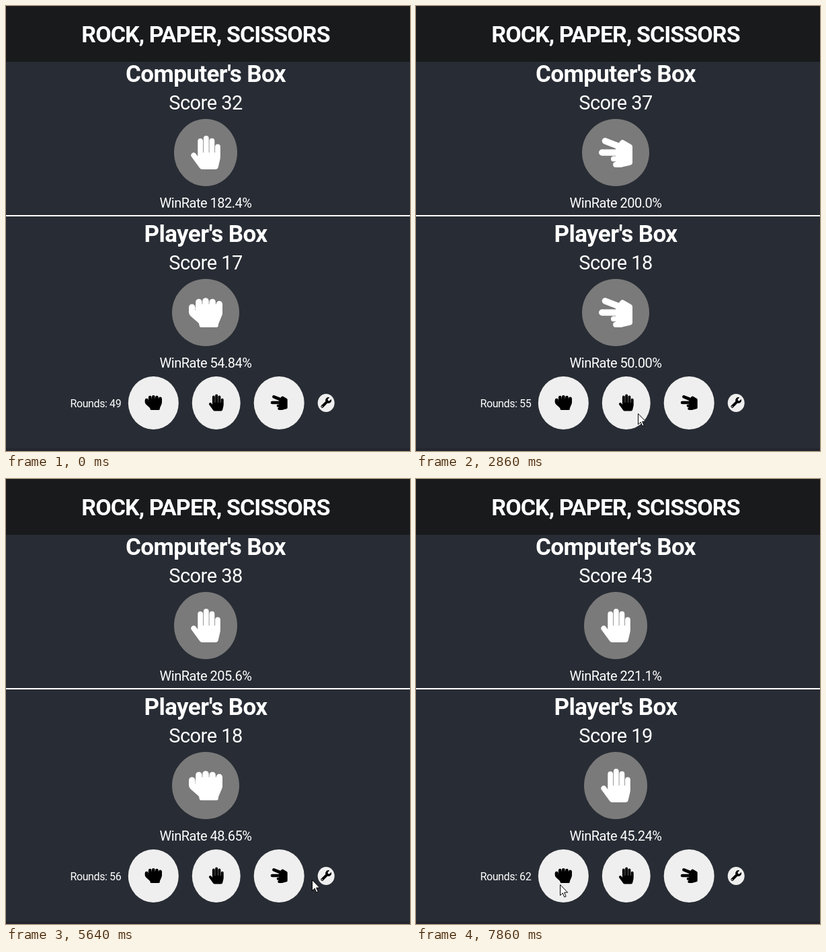
Animation, 601 px wide and 662 px high, one loop 8000 ms. Source, as an HTML page:

```html
<!DOCTYPE html>
<html lang="en">
<head>
<meta charset="utf-8">
<title>Rock, Paper, Scissors</title>
<style>
html, body { margin: 0; width: 100%; height: 100%; overflow: hidden; background: #282c34; }
svg { display: block; width: 601px; height: 662px; }
text { font-family: Roboto, "Open Sans", sans-serif; fill: #fff; text-anchor: middle; }
.title { font-size: 34px; font-weight: 700; letter-spacing: -.9px; }
.name { font-size: 35px; font-weight: 700; letter-spacing: -.6px; }
.score { font-size: 29px; letter-spacing: -.5px; }
.rate { font-size: 20px; letter-spacing: -.5px; }
.rounds { font-size: 16px; letter-spacing: -.4px; text-anchor: start; }
.tip { font: 11.5px "Open Sans", "Noto Sans", sans-serif; text-anchor: start; }
.icon { fill: currentColor; }
.line { fill: none; stroke: currentColor; stroke-linecap: round; }
</style>
</head>
<body>
<svg viewBox="0 0 601 662">
  <defs id="icons"></defs>
  <rect width="601" height="662" fill="#282c34"/>
  <rect width="601" height="83" fill="#181a1c"/>
  <rect y="658" width="601" height="4" fill="#24262f"/>
  <rect y="311" width="601" height="2" fill="#fff"/>
  <text class="title" x="297" y="53.5">ROCK, PAPER, SCISSORS</text>
  <g id="boxes" color="#fff"></g>
  <text class="rounds" id="rounds" x="95.5" y="597"></text>
  <g id="buttons" color="#000"></g>
  <g id="tip">
    <rect x="485.5" y="607.5" width="130" height="24" fill="#454a52" stroke="#fff"/>
    <text class="tip" x="493" y="624">Toggles console debug</text>
  </g>
  <g id="cursor">
    <circle id="press" r="12" fill="#ffb84d" fill-opacity=".45"/>
    <path d="M.5 .5V16.5l3.7-3.5 2.7 6 2.3-1-2.6-5.9h5z" fill="#fff" stroke="#000"/>
  </g>
</svg>
<script>
const LOOP = 8000, STEP = 73.6, FIRST = 280, PRESS = 148;
const HANDS = { R: 'rock', P: 'paper', S: 'scissors' };
const el = id => document.getElementById(id);

// Icons are drawn in a 512 square: a palm plus fingers.
const fingers = (tops, x, r) => tops.map((top, i) =>
  `M${x + i * (2 * r + 8)} 256V${top + r}a${r} ${r} 0 0 1 ${2 * r} 0V256z`).join('');
const shape = d => `<path class="icon" fill-rule="evenodd" d="${d}"/>`;
const line = (d, width) => `<path class="line" stroke-width="${width}" d="${d}"/>`;

const icons = {
  rock: shape(fingers([128, 48, 32, 48, 80], 0, 48)) +
    shape('M0 176V242q0 43 32 72L144 413q16 15 16 43a24 24 0 0 0 24 24H424a24 24 0 0 0 24-24q0-20 7.5-40L504 302q8-18 8-37V128H104V232L96 225V176z'),
  paper: shape(fingers([40, 0, 39, 128], 136, 40)) +
    shape('M136 255H480V318q0 22-5 44L448 475a48 48 0 0 1-46 37H204a48 48 0 0 1-39-20L40 319.5a40 40 0 0 1 64.5-47L136 316z'),
  scissors: line('M96 80L296 158M48 256H300', 96) + line('M224 352H320M256 440H330', 80) +
    shape('M256 480V190L304 110l25-31a40 40 0 0 1 51-10l112 64a40 40 0 0 1 20 35V408a40 40 0 0 1-31 39l-136 32z'),
  wrench: shape('M508 109a12 12 0 0 0-20-5l-75 74-68-11-11-68 74-74a12 12 0 0 0-5-20a144 144 0 0 0-171 185L19 403a64 64 0 0 0 90 90L322 280a144 144 0 0 0 186-171zM64 424a24 24 0 1 0 .1 0z')
};
el('icons').innerHTML = Object.entries(icons).map(([id, art]) => `<g id="${id}">${art}</g>`).join('');

const icon = (id, name, x, y, size) =>
  `<use id="${id}" href="#${name}" transform="translate(${x - size / 2} ${y - size / 2}) scale(${size / 512})"/>`;

const box = (id, name, y) => `
  <text class="name" x="297" y="${y + 113}">${name}</text>
  <text class="score" x="297" y="${y + 154}" id="${id}Score"></text>
  <ellipse id="${id}Disc" cx="297" cy="${y + 218}" ry="50" fill="#7a7a7a"/>
  ${icon(id + 'Hand', 'rock', 297, y + 218, 50)}
  <text class="rate" x="297" y="${y + 300}" id="${id}Rate"></text>`;
el('boxes').innerHTML = box('cpu', "Computer's Box", 0) + box('you', "Player's Box", 238);

// Buttons sit in a row, each as wide as its icon plus padding.
const centre = {};
let left = 181.8;
function button(name, width, height, size) {
  const x = centre[name] = left + width / 2;
  left += width + 20;
  return `<ellipse cx="${x}" cy="590.5" rx="${width / 2}" ry="${height / 2}" fill="#efefef"/>` +
    icon(name + 'Icon', name, x, 590, size);
}
el('buttons').innerHTML = button('rock', 75, 79, 25) + button('paper', 71.9, 79, 25) +
  button('scissors', 75, 79, 25) + button('wrench', 25, 27, 16);

// Each pair is the player's hand and the computer's hand, clicked at a steady pace.
const series = (start, pace, pairs) =>
  pairs.split(' ').map((hands, i) => ({ at: start + i * pace, hands }));
const early = series(879, 310, 'PP SR PR RP PS SR SS PS RP');
const late = series(6138, 250, 'SS PS RS RP PS SR PP');
const clicks = [...early, ...late];

// The cursor stops a little short of each button's centre and drifts in height.
function stopsFor(list, fromX) {
  return list.map(({ at, hands }) => {
    const x = centre[HANDS[hands[0]]], arrive = at - PRESS;
    const stop = { arrive, leave: at, x: x + .12 * (fromX - x), y: 602 + 7 * Math.cos(.0021 * (arrive - 2400)) };
    fromX = x;
    return stop;
  });
}
const stops = [
  { arrive: FIRST, leave: FIRST, x: 440, y: 650 },
  ...stopsFor(early, 440),
  { arrive: 3970, leave: 5580, x: 475, y: 592 },
  ...stopsFor(late, 475),
  { arrive: 7860, leave: LOOP, x: 214, y: 603 }
];

function cursorAt(t) {
  const i = Math.max(1, stops.findIndex(s => t < s.leave));
  const a = stops[i - 1], b = stops[i];
  const k = Math.min(1, Math.max(0, (t - a.leave) / (b.arrive - a.leave)));
  const ease = 1 - (1 - k) ** 2;
  return ['x', 'y'].map(axis => Math.round(a[axis] + (b[axis] - a[axis]) * ease));
}

// Each click settles the hands shown before it; rates use the scores before that.
function play(t) {
  let cpu = 32, you = 17, from = [31, 17], shown = 'RP';
  for (const { at, hands } of clicks) {
    if (at > t) break;
    const [mine, theirs] = shown;
    if (mine !== theirs) {
      from = [cpu, you];
      if (['RS', 'PR', 'SP'].includes(shown)) you++; else cpu++;
    }
    shown = hands;
  }
  return { cpu, you, from, shown };
}

function showBox(id, score, rate, hand) {
  el(id + 'Score').textContent = 'Score ' + score;
  el(id + 'Rate').textContent = 'WinRate ' + rate + '%';
  el(id + 'Hand').setAttribute('href', '#' + HANDS[hand]);
  el(id + 'Disc').setAttribute('rx', hand === 'P' ? 47 : 50);
}

const show = (id, on) => el(id).style.display = on ? '' : 'none';

function draw(now) {
  const t = now % LOOP;
  const q = FIRST + STEP * Math.floor((t - FIRST + 14) / STEP);
  const { cpu, you, from: [c, y], shown } = play(q);
  showBox('cpu', cpu, (c / y * 100).toFixed(1), shown[1]);
  showBox('you', you, (y / c * 100).toFixed(2), shown[0]);
  el('rounds').textContent = 'Rounds: ' + (cpu + you);
  show('cursor', t >= FIRST);
  show('press', clicks.some(({ at }) => q >= at - PRESS && q < at));
  show('tip', t >= 4560 && t < 5580);
  el('cursor').setAttribute('transform', `translate(${cursorAt(q)})`);
}

const start = performance.now();
function tick() {
  draw(performance.now() - start);
  requestAnimationFrame(tick);
}
tick();
</script>
</body>
</html>
```
